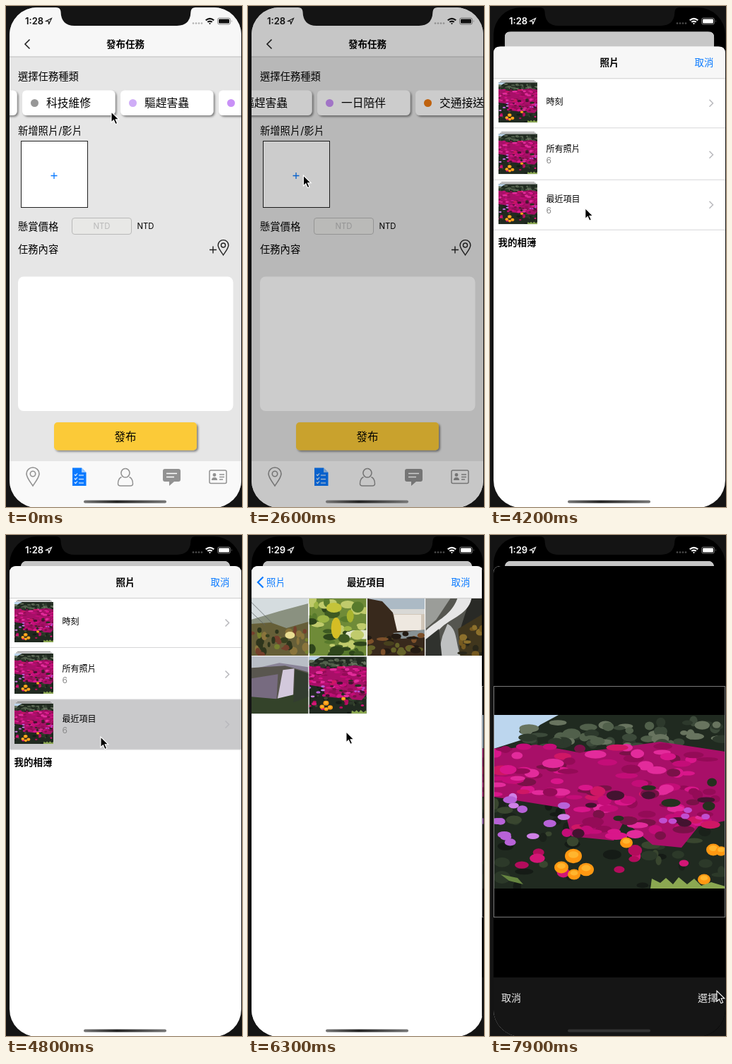
These frames come from a looping animation (334x710 px, 8000 ms). An HTML page:

```html
<!DOCTYPE html>
<html lang="zh-Hant">
<head>
<meta charset="utf-8">
<title>發布任務</title>
<style>
  html, body { margin: 0; width: 100%; height: 100%; overflow: hidden; background: #141414; }
  svg#stage { display: block; width: 334px; height: 710px; }
  text { font-family: Inter, 'Noto Sans CJK TC', 'Noto Sans CJK SC', 'Noto Sans CJK JP', 'Noto Sans CJK', sans-serif; }
</style>
</head>
<body>
<svg id="stage" viewBox="0 0 334 710" xmlns="http://www.w3.org/2000/svg"></svg>
<script>
const LOOP = 8000, WIDTH = 328, BLUE = '#0a7aff';
const stage = document.getElementById('stage');

// Markup helpers
const text = (x, y, size, str, attrs = '') => `<text x="${x}" y="${y}" font-size="${size}" ${attrs}>${str}</text>`;
const rect = (x, y, w, h, fill, attrs = '') => `<rect x="${x}" y="${y}" width="${w}" height="${h}" fill="${fill}" ${attrs}/>`;
const line = (d, color, width = 1, attrs = '') => `<path d="${d}" fill="none" stroke="${color}" stroke-width="${width}" ${attrs}/>`;
const shape = (d, fill, attrs = '') => `<path d="${d}" fill="${fill}" ${attrs}/>`;
const oval = (x, y, rx, ry, fill) => `<ellipse cx="${x.toFixed(1)}" cy="${y.toFixed(1)}" rx="${rx.toFixed(1)}" ry="${ry.toFixed(1)}" fill="${fill}"/>`;
const symbol = (id, w, h, body) => `<symbol id="${id}" viewBox="0 0 ${w} ${h}" preserveAspectRatio="xMidYMid slice">${body}</symbol>`;
const use = (id, x, y, w, h) => `<use href="#${id}" x="${x}" y="${y}" width="${w}" height="${h}"/>`;
const MID = 'text-anchor="middle"', BOLD = 'font-weight="700"';

function randomizer(seed) {
  return () => (seed = (seed * 16807) % 2147483647) / 2147483647;
}

function scatter(seed, count, colors, place) {
  const rnd = randomizer(seed);
  let out = '';
  for (let i = 0; i < count; i++) out += oval(...place(rnd), colors[Math.floor(rnd() * colors.length)]);
  return out;
}

function flowerPhoto() {
  return rect(0, 0, 328, 246, '#202a20') +
    shape('M0 0H92L66 14L44 34L0 48Z', '#bcd6ee') +
    scatter(31, 60, ['#3c4a3a', '#51604b', '#2d392c', '#68745f'], r => {
      const x = 45 + r() * 285;
      return [x, 8 + r() * 38 + Math.max(0, 70 - x) * .5, 5 + r() * 9, 3 + r() * 5];
    }) +
    scatter(8, 60, ['#2c3929', '#1a211a', '#39462f', '#151b16'], r => [r() * 328, 125 + r() * 118, 4 + r() * 10, 3 + r() * 6]) +
    shape('M0 51L60 42L120 53L180 46L235 38L328 52V150L290 158L266 188L225 184L185 150L170 178L110 172L100 132L0 116Z', '#a80f68') +
    scatter(77, 120, ['#d9168a', '#c40d78', '#e32b9b', '#940b57', '#cf1765', '#7a1148'], r => {
      const x = r() * 328, low = x < 100 ? 70 : 128;
      return [x, 44 + r() * low, 7 + r() * 9, 3 + r() * 4];
    }) +
    scatter(15, 12, ['#26301f', '#431330'], r => [120 + r() * 200, 90 + r() * 80, 6 + r() * 8, 3 + r() * 4]) +
    scatter(5, 9, ['#d21676', '#b30c5c'], r => [40 + r() * 250, 185 + r() * 42, 6 + r() * 5, 4 + r() * 4]) +
    scatter(42, 13, ['#b862d8', '#cf80e6'], r => [5 + r() * 95, 116 + r() * 66, 6 + r() * 4, 4 + r() * 2]) +
    scatter(12, 5, ['#c14ed0'], r => [240 + r() * 62, 130 + r() * 34, 6, 4]) +
    [[113, 200, 12], [96, 216, 10], [131, 219, 11], [114, 226, 9], [188, 181, 9], [311, 191, 10], [322, 193, 8], [298, 233, 9]]
      .map(([x, y, r]) => oval(x, y, r, r * .85, '#ff9812') + oval(x, y - 2, r * .6, r * .4, '#ffb52e')).join('') +
    shape('M222 246L224 232L236 238L244 231L254 240L262 230L274 240L284 232L294 242L308 237L328 243V246Z', '#8ba851') +
    shape('M10 226L34 231L42 240L22 235Z', '#668540');
}

const smallPhotos = {
  coast: rect(0, 0, 81, 81, '#d5dcdf') + shape('M0 30L40 18L81 7V81H0Z', '#8a9180') +
    shape('M0 36L28 34L50 42L81 33V81H0Z', '#665f38') +
    scatter(9, 38, ['#37401f', '#8a743b', '#77812f', '#74402c', '#2e351c'], r => [r() * 81, 42 + r() * 39, 2 + r() * 4, 2 + r() * 5]) +
    line('M0 5L31 36M0 19L20 38', '#5c6262', .8) + oval(55, 52, 7, 5, '#e9dc91'),
  leaves: rect(0, 0, 81, 81, '#6f8b38') +
    scatter(23, 55, ['#9db545', '#3e5a22', '#c0cb6c', '#587a2c', '#e2e7cb', '#2e451b'], r => [r() * 81, r() * 81, 3 + r() * 8, 2 + r() * 6]) +
    oval(38, 42, 7, 15, '#d5bd25') + oval(35, 13, 11, 7, '#c4c43a') + oval(58, 25, 5, 9, '#a9b42d'),
  cliff: rect(0, 0, 81, 81, '#d9d8d5') + rect(0, 0, 81, 15, '#acbac5') +
    shape('M25 22H81V50H25Z', '#d1c6b8') + shape('M38 23H76V48H38Z', '#eee8e0') +
    shape('M0 0L21 4L36 20L42 46L81 45V81H0Z', '#38291c') + shape('M36 49L81 44V55L48 57Z', '#889295') +
    scatter(14, 26, ['#656329', '#7d502a', '#47401d', '#241b13'], r => [r() * 81, 48 + r() * 33, 3 + r() * 6, 2 + r() * 3]),
  stream: rect(0, 0, 81, 81, '#555650') + shape('M0 0H35L15 30L0 43Z', '#9b9d99') +
    shape('M63 0H81V24L48 47Z', '#292a26') + shape('M65 0C60 25 30 29 18 46L0 76V46C15 31 36 25 45 0Z', '#e5e5e5') +
    shape('M31 36C46 43 42 65 50 81H17L24 53Z', '#bfc1c1') + shape('M0 58L19 43L23 81H0Z', '#30322e') +
    shape('M46 43L81 22V81H49Z', '#40361d') +
    scatter(4, 14, ['#765a20', '#292719', '#8c702c'], r => [50 + r() * 31, 40 + r() * 41, 3 + r() * 4, 2 + r() * 4]),
  falls: rect(0, 0, 81, 81, '#8a8498') + shape('M0 0H81V15L40 9L0 18Z', '#b9bec6') +
    shape('M0 16L48 13L81 22V81H0Z', '#59564f') + shape('M45 19L61 17L59 65L37 62Z', '#d3c9dc') +
    shape('M0 31L38 25L36 60L0 60Z', '#776b80') + shape('M0 57L35 60L81 49V81H0Z', '#34432a') +
    shape('M62 18L81 24V57L60 65Z', '#333d30')
};

const defs = `<defs>
  <clipPath id="screenClip"><rect x="5" y="2" width="328" height="709" rx="39"/></clipPath>
  <clipPath id="sheetClip"><path d="M5 54Q5 44 15 44H323Q333 44 333 54V711H5Z"/></clipPath>
  <clipPath id="cardClip"><path id="cardEdge"/></clipPath>
  <linearGradient id="homeTone"><stop stop-color="#777"/><stop offset=".4" stop-color="#222"/><stop offset="1" stop-color="#777"/></linearGradient>
  <filter id="shadow" x="-10%" y="-20%" width="125%" height="160%"><feDropShadow dx="2" dy="2" stdDeviation="1.4" flood-opacity=".45"/></filter>
  ${symbol('flowers', 328, 246, flowerPhoto())}
  ${Object.entries(smallPhotos).map(([id, body]) => symbol(id, 81, 81, body)).join('')}
</defs>`;

const pin = (x, y, s, color, w) => `<g transform="translate(${x} ${y}) scale(${s})" fill="none" stroke="${color}" stroke-width="${w}">
  <path d="M0 13C-4 7-9 1-9-4A9 9 0 0 1 9-4C9 1 4 7 0 13Z"/><circle cy="-4" r="3.7"/></g>`;

function chips() {
  const items = [['', '#999'], ['科技維修', '#979797'], ['驅趕害蟲', '#cfadf7'], ['一日陪伴', '#c991f7'], ['交通接送', '#ef7a12']];
  return items.map(([label, color], i) => {
    const x = -116 + i * 139;
    return rect(x, 119.5, 131.5, 35.5, '#fff', 'rx="6" filter="url(#shadow)"') +
      `<circle cx="${x + 17.5}" cy="137.5" r="5.5" fill="${color}"/>` + text(x + 34, 143, 15.75, label);
  }).join('');
}

function tabBar() {
  const gray = '#929292';
  return rect(5, 645, 328, 66, '#f9f9f9') + pin(38, 667, 1, gray, 1.6) +
    shape('M94 654.5H107L113.5 661V680H94Z', BLUE) + shape('M107 654.5V661H113.5Z', '#9bcaff') +
    line('M97 664l1.5 1.5 2.5-3M97 669.5l1.5 1.5 2.5-3M97 675l1.5 1.5 2.5-3M103 665h7M103 670.5h7M103 676h7', '#fff', 1.1) +
    line('M169 655.5a6 6.3 0 1 1-.1 0M163.5 667.5C160 669 158.5 673 158.5 677Q158.5 680 162 680H176Q179.5 680 179.5 677C179.5 673 178 669 174.500 667.5', gray, 1.5) +
    shape('M225 656H244Q247 656 247 659V671Q247 674 244 674H238L231 680V674H225Q222 674 222 671V659Q222 656 225 656Z', gray) +
    line('M227 662.5H242M227 667.5H238', '#fff', 1.6) +
    rect(288, 658, 24, 18.5, 'none', `rx="2" stroke="${gray}" stroke-width="1.5"`) +
    `<circle cx="295" cy="664.5" r="2.400" fill="${gray}"/>` + shape('M291 672Q291 668 295 668T299 672Z', gray) +
    line('M302 664H309M302 667.500H309M302 671H307', gray, 1.3);
}

function form() {
  return rect(5, 2, 328, 709, '#e6e6e6') + rect(5, 2, 328, 69.5, '#f7f7f7') + line('M5 72H333', '#bfbfbf') +
    line('M33.500 47.500L27 54L33.500 60.500', '#222', 1.6) +
    text(169, 59, 13.5, '發布任務', `${MID} ${BOLD}`) +
    text(17, 105, 14.3, '選擇任務種類') + `<g id="chips">${chips()}</g>` +
    text(17, 182, 14.3, '新增照片/影片') +
    rect(21.5, 191.5, 94, 94, '#fff', 'stroke="#222"') + line('M63.5 240.500H72.500M68 236V245', BLUE, 1.3) +
    text(17, 317.5, 14.3, '懸賞價格') +
    rect(93.5, 300.5, 84, 23, '#e8e8e6', 'rx="3.5" stroke="#b9b9b9"') +
    text(135.5, 316.3, 11.3, 'NTD', `${MID} fill="#b9b9b9"`) + text(185.5, 316.3, 11.3, 'NTD') +
    text(17, 349.5, 14.3, '任務內容') +
    line('M288 345.5H298M293 340.500V350.500', '#222', 1.4) + pin(307.5, 342.3, .82, '#222', 1.7) +
    rect(17, 383.5, 304.5, 190.5, '#fff', 'rx="8"') +
    rect(68, 590, 202, 39.500, '#fbca38', 'rx="5" filter="url(#shadow)"') +
    text(169, 615.5, 15.5, '發布', MID) + tabBar();
}

function albumRow(y, title, count) {
  return line(`M16 ${y - 2.500}H63M14 ${y - 1}H65`, '#777', .8) + use('flowers', 12, y, 55, 57) +
    text(79.500, y + (count ? 26 : 32), 12, title) +
    (count ? text(79.500, y + 42, 12, count, 'fill="#8a8a8a"') : '') +
    line(`M310.500 ${y + 24.500}l5 5-5 5`, '#b9b9bd', 1.5);
}

const albumList = rect(5, 44, 328, 667, '#fff') + rect(5, 233, 328, 71, '#c9c9cb', 'id="picked"') +
  line('M5 159.500H333M5 233H333M5 304H333', '#d6d6d8') +
  albumRow(95, '時刻', '') + albumRow(168, '所有照片', '6') + albumRow(239, '最近項目', '6') +
  text(11.5, 327, 13.5, '我的相簿', BOLD);

const grid = rect(5, 44, 328, 667, '#fff') +
  ['coast', 'leaves', 'cliff', 'stream', 'falls', 'flowers']
    .map((id, i) => use(id, 5 + (i % 4) * 82.3, 90 + Math.floor(i / 4) * 82.3, 81, 81)).join('');

const nav = rect(5, 44, 328, 45, '#f7f7f7') + line('M5 89.500H333', '#cfcfcf') +
  text(169, 72, 13.5, '照片', `${MID} ${BOLD} id="albumTitle"`) +
  `<g id="gridTitle">${text(169, 72, 13.5, '最近項目', `${MID} ${BOLD}`)}
   ${line('M23.500 59.500L16 67L23.500 74.500', BLUE, 2.2)}${text(28, 72, 13.4, '照片', `fill="${BLUE}"`)}</g>` +
  text(289.500, 72, 13.4, '取消', `fill="${BLUE}"`);

const crop = rect(5, 44, 328, 667, '#000') + use('flowers', 5, 255, 328, 246) +
  rect(5.5, 214.5, 327, 327, 'none', 'stroke="#7a7a7a"') + rect(5, 627, 328, 84, '#151515') +
  text(16, 660.5, 14, '取消', 'fill="#e6e6e6"') + text(294, 660.5, 14, '選擇', 'fill="#e6e6e6"');

const statusBar = `<g id="status">${text(27, 26, 13, '1:28', 'id="clock" font-weight="600"')}
  <path d="M56.500 21.500L64.500 17.500L60.500 26V22Z" fill="none" stroke="currentColor" stroke-width="1.100"/>
  ${[265, 269, 273, 277].map(x => `<circle cx="${x}" cy="24.500" r="1.300" opacity=".3"/>`).join('')}
  <path d="M282 19.500Q288.500 14 295 19.500L293.500 21Q288.500 17 283.500 21ZM284.500 22Q288.500 19 292.500 22L291 23.500Q288.500 22 286 23.500ZM287 24.500Q288.500 23.500 290 24.500L288.500 26.300Z"/>
  <rect x="299.500" y="17" width="18" height="9" rx="2.500" fill="none" stroke="currentColor" stroke-opacity=".45"/>
  <rect x="301" y="18.500" width="15" height="6" rx="1.300"/><path d="M319 20Q320.500 21.500 319 23Z" opacity=".5"/></g>`;

stage.innerHTML = defs + rect(0, 0, 334, 710, '#141414') +
  `<g clip-path="url(#screenClip)">
    ${rect(5, 2, 328, 709, '#000')}
    <g id="card"><g clip-path="url(#cardClip)">${form()}${rect(5, 2, 328, 709, '#000', 'id="shade"')}</g></g>
    <g id="sheet"><g clip-path="url(#sheetClip)">
      <g id="albums">${albumList}</g><g id="grid">${grid}</g><g id="nav">${nav}</g><g id="crop">${crop}</g>
    </g></g>
    ${statusBar}
    ${rect(110, 700.5, 117, 4, 'url(#homeTone)', 'rx="2" id="home"')}
  </g>
  ${shape('M71 0V2Q77 2 77.500 8Q78 28 97 28H242Q261 28 261.500 8Q262 2 268 2V0Z', '#141414')}
  <path id="cursor" d="M0 0V15L3.400 11.800L6 17.600L8.600 16.400L6.100 10.800H10.800Z" fill="#000" stroke="#fff" stroke-width="1.100"/>`;

const el = {};
stage.querySelectorAll('[id]').forEach(node => el[node.id] = node);

const clamp = v => Math.max(0, Math.min(1, v));
const span = (t, from, to) => clamp((t - from) / (to - from));
const easeOut = p => 1 - (1 - p) ** 3;
const easeInOut = p => p * p * (3 - 2 * p);
const move = (node, x, y = 0) => node.setAttribute('transform', `translate(${x} ${y})`);
const show = (node, visible) => node.setAttribute('display', visible ? 'inline' : 'none');

// time, x, y of the pointer tip
const pointerPath = [
  [100, 149, 150], [650, 45, 144], [1050, 45, 144], [1600, 76, 238], [2500, 76, 238], [3400, 145, 295],
  [3700, 145, 295], [4300, 134, 286], [4900, 134, 286], [5450, 114, 251], [6150, 114, 251],
  [6700, 249, 402], [7350, 321, 646]
];

function pointerAt(t) {
  const next = pointerPath.findIndex(key => key[0] > t);
  if (next < 1) return pointerPath.at(next).slice(1);
  const [t0, x0, y0] = pointerPath[next - 1], [t1, x1, y1] = pointerPath[next];
  const p = easeInOut(span(t, t0, t1));
  return [x0 + (x1 - x0) * p, y0 + (y1 - y0) * p];
}

function render(t) {
  const rise = easeOut(span(t, 3800, 4350));
  const openAlbum = easeOut(span(t, 4950, 5440));
  const openPhoto = easeOut(span(t, 6300, 6790));
  const dim = easeInOut(span(t, 2300, 2600)) * (1 - easeInOut(span(t, 3100, 3400)));

  move(el.chips, -203 * easeOut(span(t, 150, 1250)));

  const scale = 1 - rise * (1 - 296 / WIDTH);
  el.card.setAttribute('transform', `translate(${169 * (1 - scale)} ${2 + 35 * rise - 2 * scale}) scale(${scale})`);
  const r = 10 * rise;
  el.cardEdge.setAttribute('d', `M5 ${2 + r}Q5 2 ${5 + r} 2H${333 - r}Q333 2 333 ${2 + r}V711H5Z`);
  el.shade.setAttribute('opacity', .2 * Math.max(dim, rise));

  show(el.sheet, rise > 0);
  move(el.sheet, 0, 667 * (1 - rise));
  move(el.albums, -.3 * WIDTH * openAlbum);
  move(el.grid, WIDTH * (1 - openAlbum) - .3 * WIDTH * openPhoto);
  move(el.nav, -WIDTH * openPhoto);
  move(el.crop, WIDTH * (1 - openPhoto));
  show(el.picked, t >= 4700);
  el.albumTitle.setAttribute('opacity', 1 - openAlbum);
  el.gridTitle.setAttribute('opacity', openAlbum);

  const ink = t < 3950 ? '#111' : '#fff';
  el.status.setAttribute('fill', ink);
  el.status.setAttribute('color', ink);
  el.clock.textContent = t < 5200 ? '1:28' : '1:29';
  el.home.setAttribute('fill', openPhoto > .5 ? '#333' : 'url(#homeTone)');
  move(el.cursor, ...pointerAt(t));
}

const start = performance.now();
function tick() {
  render((performance.now() - start) % LOOP);
  requestAnimationFrame(tick);
}
render(0);
requestAnimationFrame(tick);
</script>
</body>
</html>
```
